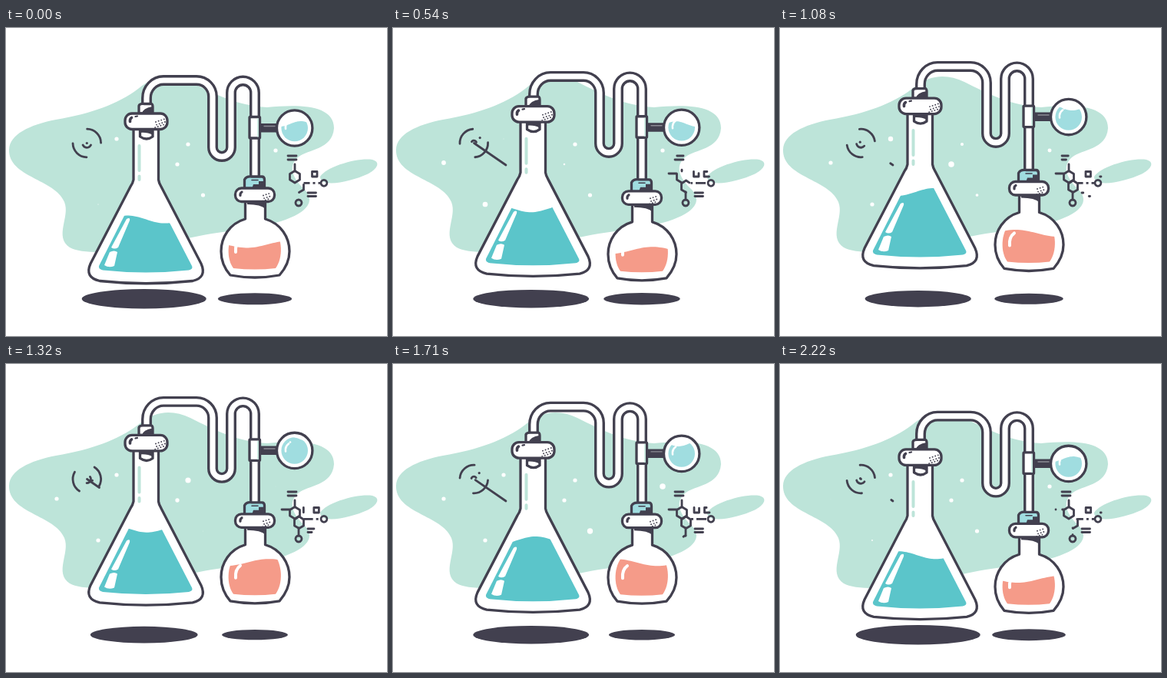
An HTML page with a canvas that plays this animation: 496 px wide and 400 px high, repeating every 2.25 s.

```html
<!DOCTYPE html>
<html lang="en">
<head>
<meta charset="utf-8">
<title>Distillation</title>
<style>
html, body { margin: 0; width: 496px; height: 400px; overflow: hidden; background: #fff }
canvas { display: block }
</style>
</head>
<body>
<canvas id="stage" width="496" height="400"></canvas>
<script>
const ctx = document.getElementById('stage').getContext('2d');
const LOOP = 2250, STEP = 30, TAU = Math.PI * 2;
const INK = '#42404f', MINT = '#bde4d9', TEAL = '#5bc5ca', SKY = '#a0dde0', CORAL = '#f59b89', WHITE = '#fff';

const clamp = v => Math.max(0, Math.min(1, v));
const frac = v => v - Math.floor(v);
const wave = (t, delay) => Math.cos(TAU * (t - delay));
const path = d => new Path2D(d);

const shapes = {
  blob: path('M4 158C5 138 30 126 65 119C112 111 145 99 172 79C196 59 218 60 240 70C272 86 302 101 340 103C380 99 427 99 427 130C425 158 394 157 380 168C366 180 374 196 389 210C402 224 395 239 358 251C320 262 270 264 225 276C170 292 102 296 83 285C62 271 84 245 76 226C64 196 3 194 4 158Z'),
  leaf: path('M409 193C417 180 458 168 477 171C488 174 484 183 470 190C450 199 409 209 409 193Z'),
  tube: path('M183 118V91A22 23 0 0 1 205 68H248A21 21 0 0 1 269 89V155A12 12 0 0 0 293 155V84A15.5 15.5 0 0 1 324 84V205'),
  cone: path('M166 125V197Q165 202 162 206L110 306Q102 324 122 328.5Q182 335 243 328.5Q262 324 254 306L202 206Q199 201 198.5 197V125'),
  coneInside: path('M165 222L121 309Q120 313 126 314.5Q182 320.5 238 314.5Q244 313 242 309L197 222Z'),
  coneShine: path('M157 248Q162 245 161 250L146 285Q141 288 137 285ZM135 291Q141 288 145 291L141 309Q134 312 128 308Z'),
  neckShine: path('M173.5 153V185M173.5 192.5V197'),
  round: path('M311.5 222V248C291 254 280 272 280 290C280 302 284 312 292 321Q324 327 356 321C364 312 369 302 369 290C369 272 358 254 337.5 248V222'),
  roundInside: path('M299 262C287 276 287 300 296 312Q324 315 351 312C361 298 360 274 349 260Z'),
  roundShine: path('M305 275Q298 280 299 291')
};

function fill(shape, color) {
  ctx.fillStyle = color;
  ctx.fill(shape);
}
function stroke(shape, width = 3.3, color = INK) {
  ctx.lineWidth = width;
  ctx.strokeStyle = color;
  ctx.stroke(shape);
}
function outlined(shape, color = WHITE) {
  fill(shape, color);
  stroke(shape);
}
function oval(x, y, rx, ry = rx) {
  const p = new Path2D();
  p.ellipse(x, y, rx, ry, 0, 0, TAU);
  return p;
}
function pill(x, y, w, h, r) {
  const p = new Path2D();
  p.roundRect(x, y, w, h, r);
  return p;
}
function shifted(dy, draw) {
  ctx.save();
  ctx.translate(0, dy);
  draw();
  ctx.restore();
}

// Liquid with a travelling surface wave, kept inside the glass
function liquid(inside, color, x0, x1, bottom, level, height, phase) {
  const p = new Path2D();
  p.moveTo(x0 - 60, bottom);
  for (let i = 0; i <= 24; i++) {
    const u = i / 12 - 1;
    p.lineTo(x0 + (x1 - x0) * i / 24, level + height * Math.sin(2 * u - phase));
  }
  p.lineTo(x1 + 60, bottom);
  ctx.save();
  ctx.clip(inside);
  fill(p, color);
  ctx.restore();
}

// Strokes only the part from a to b of a path of the given length
function trim(shape, length, a, b, width = 2.8) {
  if (b - a < .01) return;
  ctx.save();
  if (b - a < 1) {
    ctx.setLineDash([length * (b - a), length * (1 - b + a)]);
    ctx.lineDashOffset = -a * length;
  }
  stroke(shape, width);
  ctx.restore();
}

function stipple(x, y, cols) {
  for (let row = 0; row < 3; row++)
    for (let i = 0; i < cols; i++)
      fill(oval(x + i * 3.6 - row * .4 + (row % 2) * 1.5, y + row * 3.6 - i * 1.2, .95), INK);
}

function drawBackground(t) {
  fill(shapes.blob, MINT);
  fill(shapes.leaf, MINT);
  const dots = [[144, 144, .26], [237, 151, .39], [223, 177, .3], [256.5, 217, .57], [66, 175, 0], [120, 229, .03], [351, 159, .6]];
  for (const [x, y, gone] of dots) {
    const d = frac(t - gone + .5) - .5;
    const r = 2.6 * Math.min(1, Math.abs(d) * 8) + 1.2 * Math.exp(-(((d - .17) / .06) ** 2));
    fill(oval(x, y, r), WHITE);
  }
}

function drawShadows(t) {
  const left = wave(t, 0), right = wave(t, 1 / 6);
  fill(oval(179.7, 351.7, 75 + 6 * left, 11.7 + left), INK);
  fill(oval(324, 351.7, 46.3 + 3.8 * right, 7.2 + .6 * right), INK);
}

function drawTube(t) {
  shifted(10 * (wave(t, .06) - wave(0, .06)), () => {
    stroke(shapes.tube, 13.9);
    stroke(shapes.tube, 7.2, WHITE);
  });
}

function drawBulb(t) {
  const delay = 1 / 9;
  shifted(10 * (wave(t, delay) - wave(0, delay)), () => {
    fill(pill(331, 124, 23, 11.5, 1), INK);
    stroke(path('M336 127.5H350'), 1.4, '#8b8a94');
    outlined(pill(317, 115.5, 13.5, 27.5, 1));
    stroke(path('M328 118V141'), 1.5, MINT);
    outlined(oval(375.7, 130, 23.2));
    liquid(oval(375.7, 130, 17.3), SKY, 358, 393, 150, 121 + 5.5 * wave(t, .14), 3.5, 3 * TAU * (t - .2));
    stroke(path('M368 121Q363 125 364 131'), 2.6, WHITE);
    fill(oval(370, 119, 1.3), WHITE);
  });
}

function drawCone(t) {
  shifted(10 * (wave(t, 0) - 1), () => {
    outlined(shapes.cone);
    liquid(shapes.coneInside, TEAL, 152, 213, 322, 240.5 + 8.5 * wave(t, .05), 5, 3 * TAU * t);
    fill(shapes.coneShine, WHITE);
    stroke(shapes.neckShine, 4, MINT);

    outlined(path('M174.5 130V141Q183 147 191 141V130Z'));
    fill(path('M174 130H191V139Q184 135 174 136Z'), INK);
    outlined(path('M173 111V101Q174 98 180 98.5H188Q191 98 191 102V111Z'));
    fill(path('M177 111Q178 104 191 102V111Z'), INK);
    outlined(pill(155, 111, 55, 20.5, 9));
    stroke(path('M161.5 121.5Q161 118 163.5 116.5'), 3.6);
    stroke(path('M168.5 115L171 114.5'), 2.2);
    stipple(195, 122, 4);
  });
}

function drawRound(t) {
  const delay = 1 / 6;
  shifted(9.6 * (wave(t, delay) - .5), () => {
    outlined(shapes.round);
    fill(path('M314 224H338V235Q332 229 314 229Z'), INK);
    liquid(shapes.roundInside, CORAL, 289, 359, 318, 277.5 + 8 * wave(t, .18), 4.5, 3 * TAU * (t - .115));
    stroke(shapes.roundShine, 4, WHITE);

    outlined(path('M310.5 209V197Q313 192 320 193H333Q336.5 193 336.5 197V209Z'), SKY);
    fill(path('M322 203H329V199H337V209H320Z'), INK);
    stroke(path('M320 197.5H328'), 1.6);
    outlined(pill(298.5, 208, 51, 17.5, 8));
    stroke(path('M305 217.5Q304.5 214.5 307 213'), 3.2);
    stipple(335, 217.5, 3);
  });
}

function drawOrbit(t) {
  const x = 105.3, y = 149.5, p = frac(2 * t);
  const arc = (r, mid, half) => {
    const a = new Path2D();
    a.arc(x, y, r, mid - half, mid + half);
    stroke(a, 2.8);
  };
  const turn = TAU * (t - 1 / 8);
  arc(18.3, turn, TAU * .122);
  arc(18.3, turn + TAU / 2, TAU * .122);
  arc(4.6 + 1.2 * Math.cos(2 * TAU * t), TAU / 4 - 2 * TAU * t, TAU * .18);

  const from = clamp((p - .5) * 2), to = clamp(p / .45);
  if (p > 0) trim(path('M105.5 149.5L147 178'), 50.4, from, Math.max(to, from + .012));

  const angle = TAU * (1 / 8 - p / 2), reach = 10.5 * Math.min(1, 4 * p, 4 * (1 - p));
  fill(oval(x + reach * Math.cos(angle), y + reach * Math.sin(angle), 1.6), INK);
}

function drawMolecule(t) {
  // Path, length, moment it is fully erased, time to erase or redraw
  const bonds = [
    ['M367 166H378', 11, .36, .16],
    ['M367 171H378', 11, .4, .16],
    ['M376 177V186', 9, .26, .1],
    ['M376 201L369.5 197V189.5L376 185.5L382.5 189.5V197Z', 45.6, .2, .12],
    ['M381.5 213.5L375.5 210V202L381.5 198L387.5 202V210Z', 44.4, .08, .26],
    ['M359 189H369', 10, 0, .1],
    ['M381 213V223', 10, 0, .1],
    ['M381 223A4 4 0 1 1 380.9 223Z', 25.1, .78, .13],
    ['M414 197.3A4 4 0 1 1 413.9 197.3Z', 25.1, .37, .1],
    ['M393 214H403.5', 10.5, .45, .18],
    ['M393 218.5H403.5', 10.5, .5, .18]
  ];
  for (const [d, length, gone, span] of bonds) {
    const k = (frac(t - gone + .5) - .5) / span;
    if (k < 0) trim(path(d), length, clamp(1 + k), 1);
    else trim(path(d), length, 0, clamp(k));
  }

  // Small boxes drift right, drawn in on the way and erased at the end
  const p = frac(2 * t);
  for (const q of [p, p + 1]) {
    const x = 398.5 + 13.5 * (q - 1), out = clamp((q - 1.2) / .8);
    const box = path(`M${x} 186.5v6.5h6.5v-6.5Z`);
    if (q < 1) trim(box, 26, 0, clamp(q / .72));
    else trim(box, 26, .5 + out, 1.5);
  }

  ctx.save();
  ctx.lineCap = 'butt';
  ctx.setLineDash([13, 4, 3, 4]);
  ctx.lineDashOffset = 5 - 24 * p;
  stroke(path('M387.5 201.3H410'), 2.8);
  ctx.restore();
}

function frame() {
  const ms = performance.now() % LOOP;
  const t = Math.floor(ms / STEP) * STEP / LOOP;
  fill(pill(0, 0, 496, 400, 0), WHITE);
  ctx.lineCap = ctx.lineJoin = 'round';
  for (const draw of [drawBackground, drawShadows, drawTube, drawBulb, drawCone, drawRound, drawOrbit, drawMolecule]) draw(t);
  requestAnimationFrame(frame);
}
frame();
</script>
</body>
</html>
```
